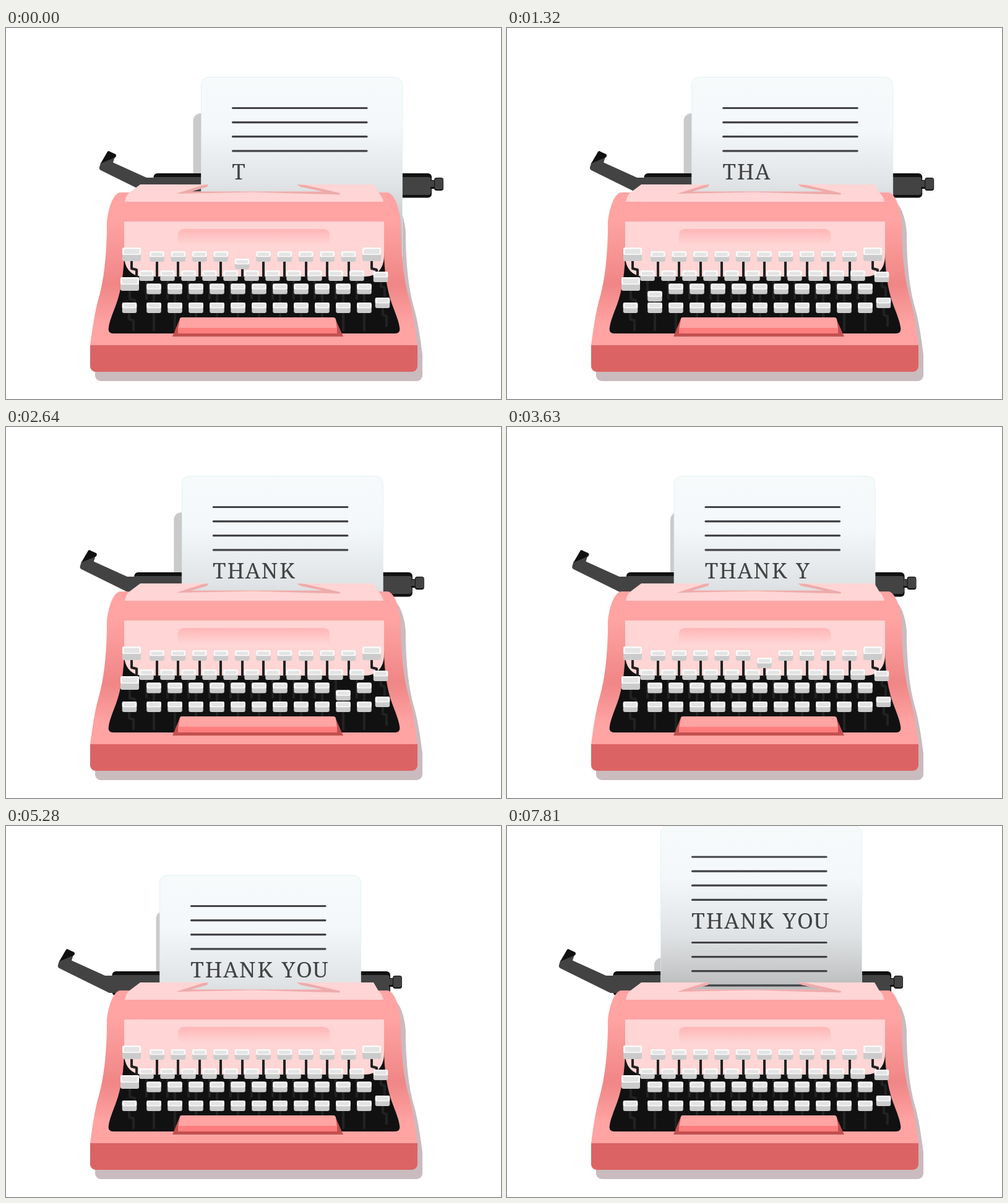
These frames come from a looping animation (800x600 px, 8 s). An HTML page:

```html
<!DOCTYPE html>
<html lang="en">
<head>
<meta charset="utf-8">
<title>Typewriter</title>
<style>
  html, body { margin: 0; width: 100%; height: 100%; overflow: hidden; background: #fff; }
  svg { display: block; width: 100%; height: 100%; }
  text { font: 300 35px "Noto Serif", serif; text-anchor: middle; fill: #434343; }
</style>
</head>
<body>
<svg viewBox="0 0 800 600">
  <defs>
    <linearGradient id="sheet" gradientUnits="userSpaceOnUse" x1="0" y1="79" x2="0" y2="339">
      <stop offset="0" stop-color="#f6fafb"/>
      <stop offset=".32" stop-color="#f4f8fa"/>
      <stop offset=".68" stop-color="#e0e3e5"/>
      <stop offset="1" stop-color="#bcbdbe"/>
    </linearGradient>
    <linearGradient id="shell" gradientUnits="userSpaceOnUse" x1="0" y1="266" x2="0" y2="513">
      <stop offset=".18" stop-color="#ffa3a3"/>
      <stop offset=".3" stop-color="#fb9b9b"/>
      <stop offset=".6" stop-color="#f08686"/>
      <stop offset=".86" stop-color="#ffa3a3"/>
    </linearGradient>
    <linearGradient id="recess" x1="0" y1="0" x2="0" y2="1">
      <stop offset="0" stop-color="#ffb6b6"/>
      <stop offset="1" stop-color="#ffd5d5"/>
    </linearGradient>
    <path id="body" d="M184 266H617C630 268 638 302 638 318V330C639 372 643 408 651 436C658 460 662 490 665 513V547A9 9 0 0 1 656 556H145A9 9 0 0 1 136 547V513C139 490 143 460 150 436C158 408 162 372 163 330V318C163 302 171 268 184 266Z"/>
  </defs>

  <use href="#body" x="8" y="15" fill="#c9bbbe"/>

  <g id="carriage">
    <rect id="backSheet" width="60" rx="12" fill="#cacaca"/>
    <rect x="238.500" y="235" width="449.500" height="39.500" rx="6" fill="#111"/>
    <path d="M240 241H683Q687 241 687 245V265Q687 270 682 270H240Z" fill="#434343"/>
    <rect x="686" y="246" width="9" height="14" fill="#111"/>
    <rect x="686" y="247" width="9" height="10" fill="#434343"/>
    <rect x="692" y="242" width="15" height="21" rx="4" fill="#111"/>
    <rect x="693" y="243" width="13.500" height="18" rx="3.500" fill="#434343"/>
    <path d="M153 218L176 208L173 217.500L227 242H246V270H234L153 230Q150 228 151 225Z" fill="#434343"/>
    <path d="M164 200Q166 198 168 200L177 204Q179 206 177 209L153 219Z" fill="#111"/>
    <g id="paper">
      <rect x="315.500" y="79.500" width="325" height="300" rx="12" fill="url(#sheet)" stroke="#d9eeee" stroke-width=".7"/>
      <g id="rules" stroke="#434347" stroke-width="3.200" stroke-linecap="round"></g>
      <text id="typed" y="245" x="376 402.500 430 457 485.500 505 523.500 549 575"></text>
    </g>
  </g>

  <use href="#body" fill="url(#shell)"/>
  <path d="M136 513H665V547A9 9 0 0 1 656 556H145A9 9 0 0 1 136 547Z" fill="#dc6363"/>
  <path fill-rule="evenodd" fill="#ffd5d5" d="M217 253H594L601 265Q608 272 610 281H192Q194 270 201 265ZM327 253L324 257L299 264.500H512L478 257L470 253Z"/>
  <path fill="#eeabab" d="M275 268L318 254L327 253L325 257L299 264.500H512L476 257L470 253L484 254L540 267L539 269.500L400 265.500Z"/>
  <path d="M191 360C191 395 186 425 178 447C172 463 167 475 166 484Q164 494 173 494H629Q638 494 636 484C635 475 630 463 624 447C616 425 611 395 611 360Z" fill="#111"/>
  <path d="M191 313H611V368C611 390 598 402 580 402H222C204 402 191 390 191 368Z" fill="#ffd5d5"/>
  <path d="M278 351V335Q278 325 288 325H513Q523 325 523 335V351Z" fill="url(#recess)"/>
  <g id="stems" fill="none" stroke="#222" stroke-width="4" stroke-linejoin="round"></g>
  <g id="keys"></g>
  <path d="M281 470H532L545 499H269Z" fill="#c25050"/>
  <path d="M281 471Q281 468 284 468H529Q532 468 533 471L535 486H278Z" fill="#ffa3a3"/>
  <path d="M278 485H535V494H278Z" fill="#ff7d7d"/>
</svg>
<script>
const LOOP = 8000, BEAT = 330, PRESS = 12;
const SCRIPT = "T>H>A>N>K>>Y>O>U>";   // ">" moves the carriage one step
const $ = id => document.getElementById(id);

function add(parent, tag, attrs) {
  const node = document.createElementNS("http://www.w3.org/2000/svg", tag);
  for (const name in attrs) node.setAttribute(name, attrs[name]);
  return parent.appendChild(node);
}

const stem = d => add($("stems"), "path", { d });

function key(cx, y, w = 23.5, h = 17) {
  const g = add($("keys"), "g", {}), x = cx - w / 2, face = h * .55;
  add(g, "rect", { x, y, width: w, height: h, rx: 3, fill: "#cbcbcb" });
  add(g, "rect", { x, y, width: w, height: face, rx: 2, fill: "#fafafa" });
  add(g, "rect", { x: x + 2.5, y: y + 2.5, width: w - 5, height: face - 4, rx: 1, fill: "#e4e4e4" });
  return g;
}

function row(count, x, step, y, stemEnd) {
  return Array.from({ length: count }, (_, i) => {
    const cx = x + i * step;
    stem(`M${Math.round(cx)} ${y + 15}V${stemEnd}`);
    return key(cx, y);
  });
}

// Cranked stems of the outer keys
for (const [x, y, rise, run, drop] of [
  [203, 375, 14, 8, 12], [591, 375, 14, 8, 12], [200, 423, 15, 8, 5],
  [199, 459, 12, 7, 17], [606, 409, 9, 6, 15], [609, 451, 13, 6, 17]
]) stem(`M${x} ${y}v${rise}l${run} 2v${drop}`);

const top1 = row(10, 244, 34.4, 361, 404);
key(203, 355, 30, 22);
key(591, 355, 30, 22);
const row2 = row(11, 227, 34, 392, 439);
const side = key(605.5, 394);
key(200, 403, 30, 22);
const row3 = row(11, 239, 34, 413.5, 444);
const row4 = row(11, 239, 34, 444, 490);
key(199.5, 444);
key(608.5, 436);

const keyOf = {
  T: top1[4], Y: top1[5], H: row2[6], O: row2[10],
  U: side, A: row3[0], K: row3[9], N: row4[7]
};

for (const first of [129.5, 268])
  for (let i = 0; i < 4; i++)
    add($("rules"), "path", { d: `M366.500 ${first + i * 23.1}H583` });

function draw(t) {
  const beat = Math.min(Math.floor(t / BEAT), SCRIPT.length - 1);
  const done = SCRIPT.slice(0, beat + 1);
  const steps = done.split(">").length - 1;
  const shift = steps ? -9.7 - 7.16 * (steps - 1) : 0;
  const feed = t < 7610 ? 0 : t < 7810 ? 31 : 79.5;
  const backX = feed ? 305 : steps < 6 ? 302.5 : 309.5;
  const backY = feed ? (feed < 50 ? 172 : 213) : 138;

  $("carriage").setAttribute("transform", `translate(${shift})`);
  $("paper").setAttribute("transform", `translate(0 ${-feed})`);
  $("backSheet").setAttribute("x", backX);
  $("backSheet").setAttribute("y", backY);
  // Keep the sheet's lower end behind the machine
  $("backSheet").setAttribute("height", 262 - backY);
  $("typed").textContent = done.replace(/>>/g, " ").replace(/>/g, "");
  for (const letter in keyOf)
    keyOf[letter].setAttribute("transform", `translate(0 ${letter === SCRIPT[beat] ? PRESS : 0})`);
}

const start = performance.now();
function tick() {
  draw((performance.now() - start) % LOOP);
  requestAnimationFrame(tick);
}
tick();
</script>
</body>
</html>
```
